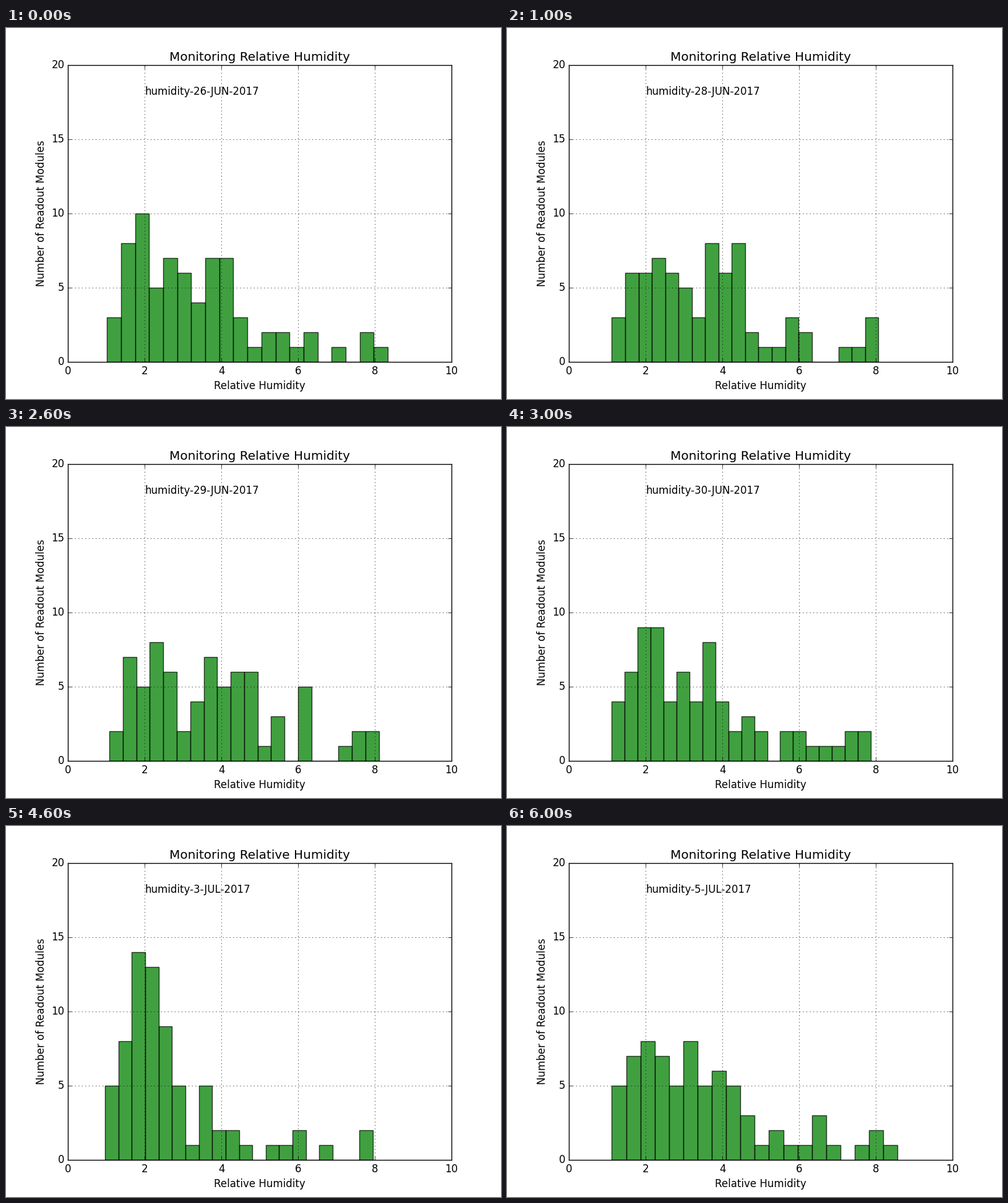
Animation of 800x600 px, one loop 7000 ms. Source, as a matplotlib script:

```python
import numpy as np
import matplotlib.pyplot as plt
from matplotlib.animation import FuncAnimation

plt.style.use("classic")
plt.rcParams["font.family"] = "DejaVu Sans"

BINS = 20

# day: (lowest value, highest value), modules per bin
DAYS = {
    "26-JUN": ((1.02, 8.34), [3, 8, 10, 5, 7, 6, 4, 7, 7, 3, 1, 2, 2, 1, 2, 0, 1, 0, 2, 1]),
    "28-JUN": ((1.12, 8.07), [3, 6, 6, 7, 6, 5, 3, 8, 6, 8, 2, 1, 1, 3, 2, 0, 0, 1, 1, 3]),
    "29-JUN": ((1.08, 8.11), [2, 7, 5, 8, 6, 2, 4, 7, 5, 6, 6, 1, 3, 0, 5, 0, 0, 1, 2, 2]),
    "30-JUN": ((1.12, 7.87), [4, 6, 9, 9, 4, 6, 4, 8, 4, 2, 3, 2, 0, 2, 2, 1, 1, 1, 2, 2]),
    "3-JUL": ((0.97, 7.95), [5, 8, 14, 13, 9, 5, 1, 5, 2, 2, 1, 0, 1, 1, 2, 0, 1, 0, 0, 2]),
    "4-JUL": ((0.89, 7.69), [6, 5, 9, 12, 8, 8, 5, 5, 0, 3, 3, 0, 1, 1, 3, 0, 0, 1, 1, 1]),
    "5-JUL": ((1.12, 8.57), [5, 7, 8, 7, 5, 8, 5, 6, 5, 3, 1, 2, 1, 1, 3, 1, 0, 1, 2, 1]),
}
NAMES = list(DAYS)

fig, ax = plt.subplots(figsize=(8, 6), dpi=100, facecolor="white")
bars = ax.bar(np.arange(BINS), np.ones(BINS), width=1, align="edge",
              color="green", edgecolor="black", linewidth=1, alpha=0.75)
label = ax.text(2, 18, "", fontsize=12)

ax.set_xlim(0, 10)
ax.set_ylim(0, 20)
ax.set_xticks(range(0, 11, 2))
ax.set_yticks(range(0, 21, 5))
ax.set_xlabel("Relative Humidity")
ax.set_ylabel("Number of Readout Modules")
ax.set_title("Monitoring Relative Humidity", y=1.0)
ax.grid(True)


def show_day(i):
    day = NAMES[i]
    (low, high), counts = DAYS[day]
    edges = np.linspace(low, high, BINS + 1)
    for bar, left, right, count in zip(bars, edges, edges[1:], counts):
        bar.set_bounds(left, 0, right - left, count)
    label.set_text(f"humidity-{day}-2017")
    return [*bars, label]


anim = FuncAnimation(fig, show_day, frames=len(NAMES), init_func=lambda: show_day(0),
                     interval=1000, repeat=True, repeat_delay=0, blit=False)
plt.show()
```
